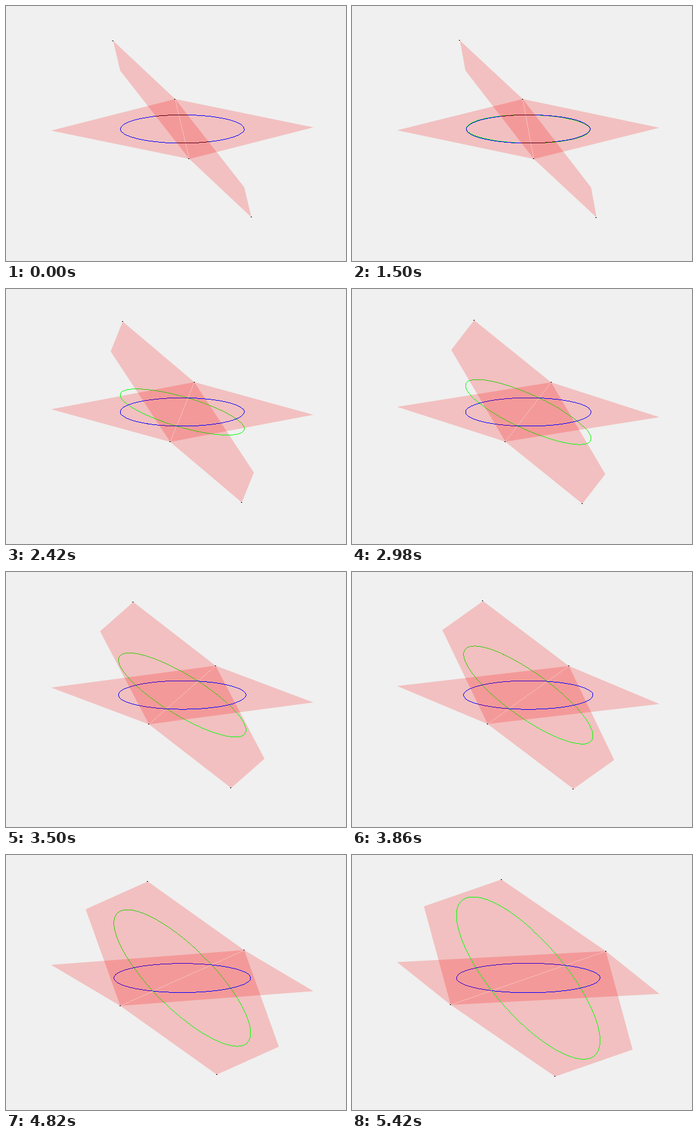
A matplotlib script that plays this animation: 560x420 px, repeating every 6920 ms.

```python
import numpy as np
import matplotlib.pyplot as plt
from matplotlib.animation import FuncAnimation
from matplotlib.collections import PolyCollection
from matplotlib.patches import Polygon

W, H, DPI = 560, 420, 100
TICK, LOOP = 20, 6920
HOLD, STEP, LAST = 1500, 40, 99
CENTER = np.array([289.8, 202.1])
HALF_WIDTH = 216
RADIUS = np.sqrt(2) / 3
CELL = 0.4 * np.array([[-1, -1], [1, -1], [1, 1], [-1, 1]])

fig = plt.figure(figsize=(W / DPI, H / DPI), dpi=DPI, facecolor="#f0f0f0")
ax = fig.add_axes([0, 0, 1, 1])
ax.set_xlim(-0.5, W - 0.5)
ax.set_ylim(H - 0.5, -0.5)
ax.axis("off")


def plane(z):
    patch = Polygon(np.zeros((4, 2)), facecolor="red", alpha=0.2, lw=0,
                    edgecolor="none", zorder=z)
    return ax.add_patch(patch)


def pixels(color, z):
    """A set of hard single pixels; lines without smoothing are built of these."""
    cells = PolyCollection([], facecolors=color, edgecolors="none",
                           linewidths=0, antialiaseds=False, zorder=z)
    cells.set_snap(False)
    return ax.add_collection(cells, autolim=False)


def fill(cells, spots):
    cells.set_verts(np.asarray(spots)[:, None, :] + CELL)


def trace(cells, points):
    """Step along a path one pixel at a time on its longer axis."""
    points = CENTER + np.asarray(points)
    length = np.abs(np.diff(points, axis=0)).max(axis=1)
    along = np.concatenate([[0], np.cumsum(length)])
    at = np.linspace(0, along[-1], int(np.ceil(along[-1])) + 1)
    spots = [np.interp(at, along, points[:, k]) for k in (0, 1)]
    fill(cells, np.rint(np.column_stack(spots)))


# Each surface is cut along the shared axis so that depth order is right.
flat_left, tilt_right = plane(1), plane(1)
tilt_left, flat_right = plane(4), plane(4)
green_left, green_right = pixels("#00ff00", 2), pixels("#00ff00", 2)
blue_left, blue_right = pixels("#0000ff", 3), pixels("#0000ff", 5)
shade_left, shade_right = pixels("#5c0014", 6), pixels("#5c0014", 6)
seam, dots = pixels("#f4bfbf", 4.5), pixels("black", 7)
shade_left.set_clip_path(tilt_left)
shade_right.set_clip_path(tilt_right)
artists = [flat_left, tilt_right, tilt_left, flat_right, green_left,
           green_right, blue_left, blue_right, shade_left, shade_right,
           seam, dots]

right_arc = np.linspace(0, np.pi, 31)
left_arc = right_arc + np.pi


def arc(a, b, t):
    return RADIUS * (np.outer(np.cos(t), a) + np.outer(np.sin(t), b))


def draw(i):
    n = int(np.clip((i * TICK - HOLD) // STEP + 1, 0, LAST))
    turn = np.radians(np.interp(n, [0, 1, 68, 84, LAST],
                                [-3.1, -2.4, 19.9, 25.3, 30.6]))
    # The view keeps its width, so the scale grows as the scene turns.
    scale = HALF_WIDTH / np.cos(turn)
    rise = 244 + 0.29 * (scale - 216.3)
    depth = 0.2025 * rise
    a = np.array([HALF_WIDTH * np.tan(turn), -depth * np.cos(turn)])
    b = np.array([HALF_WIDTH, depth * np.sin(turn)])
    up = np.array([0, rise])
    c = (a - b - up) / 2

    flat_left.set_xy(CENTER + [a, -b, -a])
    flat_right.set_xy(CENTER + [a, b, -a])
    tilt_left.set_xy(CENTER + [a, c, c - a, -a])
    tilt_right.set_xy(CENTER + [a, a - c, -c, -a])

    # Once fully raised, the curve lies in the tilted plane and shows on top.
    lifted = b + up * n / LAST
    for t, line, z in ((left_arc, green_left, 2), (right_arc, green_right, 2)):
        trace(line, arc(a, lifted, t))
        line.set_zorder(4.8 if n == LAST else z)
    for t, line, shade in ((left_arc, blue_left, shade_left),
                           (right_arc, blue_right, shade_right)):
        points = arc(a, b, t)
        trace(line, points)
        trace(shade, points)
        shade.set_visible(n < 2)
    trace(seam, [a, -a])
    corners = np.rint(CENTER + [a, -a, c, -c])
    fill(dots, np.concatenate([corners, corners - [1, 0]]))
    return artists


anim = FuncAnimation(fig, draw, frames=LOOP // TICK, interval=TICK,
                     init_func=lambda: draw(0), repeat=True, repeat_delay=0)
plt.show()
```
